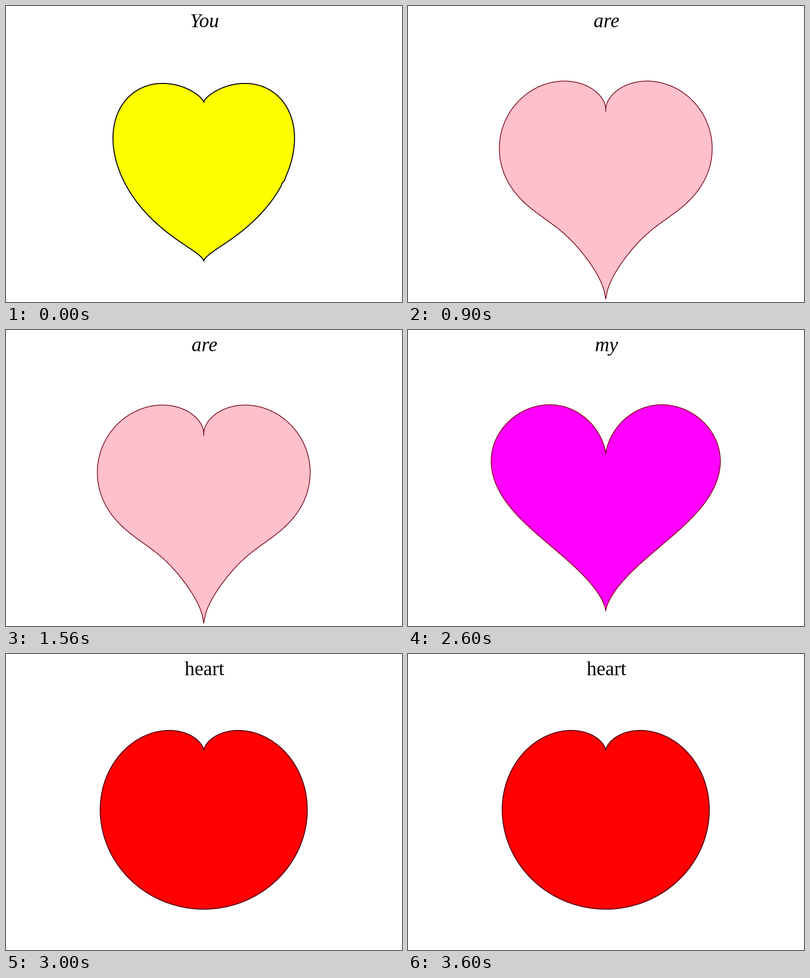
Recreate the animation shown at these times as an HTML page. Size 800 px wide and 600 px high, loop 4000 ms.

```html
<!DOCTYPE html>
<html lang="en">
<head>
<meta charset="utf-8">
<title>You are my heart</title>
<style>
  html, body { margin: 0; width: 100%; height: 100%; overflow: hidden; background: #fff; }
  svg { display: block; width: 800px; height: 600px; }
  path { stroke-linejoin: round; }
  text { font: 40px "Liberation Serif", "Times New Roman", serif; text-anchor: middle; }
  .italic { font-style: italic; }
</style>
</head>
<body>
<svg id="stage" viewBox="0 0 800 600"></svg>
<script>
const { sin, cos, abs, sqrt, cbrt, exp, min, PI } = Math;
const LOOP = 4000;
const CENTER_X = 399.5;
const SAMPLES = 720;

const polar = radius => t => {
  const r = radius(t);
  return [r * cos(t), r * sin(t)];
};

// (x² + y² - 1)³ = x²y³, solved for the radius by Newton's method
function sexticRadius(t) {
  const k = cbrt(cos(t) ** 2) * sin(t);
  let r = 1.6;
  for (let i = 0; i < 12; i++) {
    const root = cbrt(r * r);
    r -= (r * r - 1 - k * r * root) / (2 * r - 5 / 3 * k * root);
  }
  // small kink where the curve crosses the positive x axis
  return r + 0.45 * t * exp(-((t / 0.03) ** 2));
}

function pointedRadius(t) {
  const s = sin(t);
  return min(3.94, 2 - 2 * s + s * sqrt(abs(cos(t))) / (s + 1.4));
}

const trigHeart = t => [
  16 * sin(t) ** 3,
  13 * cos(t) - 5 * cos(2 * t) - 2 * cos(3 * t) - cos(4 * t)
];

const scenes = [
  { start: 0, word: "You", italic: true, curve: polar(sexticRadius),
    y: 356, scale: 161, fill: "#ff0", stroke: "#000", width: 2 },
  { start: 900, word: "are", italic: true, curve: polar(pointedRadius),
    y: 214, scale: 96.5, fill: "#ffc0cb", stroke: "#740010", width: 1.5 },
  { start: 2000, word: "my", italic: true, curve: trigHeart,
    y: 324, scale: 14.47, fill: "#f0f", stroke: "#7a0008", width: 1.5 },
  { start: 3000, word: "heart", italic: false, curve: polar(t => 1 - sin(t)),
    y: 195.2, scale: 161, fill: "#f00", stroke: "#5a0016", width: 2 }
];

function add(parent, tag, attributes) {
  const node = document.createElementNS("http://www.w3.org/2000/svg", tag);
  for (const [name, value] of Object.entries(attributes)) node.setAttribute(name, value);
  return parent.appendChild(node);
}

function outline({ curve, y, scale }) {
  const points = Array.from({ length: SAMPLES }, (_, i) => {
    const [px, py] = curve(-PI + 2 * PI * i / SAMPLES);
    return `${(CENTER_X + scale * px).toFixed(2)} ${(y - scale * py).toFixed(2)}`;
  });
  return `M${points.join("L")}Z`;
}

const stage = document.getElementById("stage");
const groups = scenes.map(scene => {
  const group = add(stage, "g", {});
  add(group, "path", {
    d: outline(scene), fill: scene.fill,
    stroke: scene.stroke, "stroke-width": scene.width
  });
  const label = add(group, "text", { x: 401, y: 43, class: scene.italic ? "italic" : "" });
  label.textContent = scene.word;
  return group;
});

const begin = performance.now();
function draw() {
  const time = (performance.now() - begin) % LOOP;
  const current = scenes.findLastIndex(scene => scene.start <= time);
  groups.forEach((group, i) => { group.style.display = i === current ? "" : "none"; });
  requestAnimationFrame(draw);
}
draw();
</script>
</body>
</html>
```
